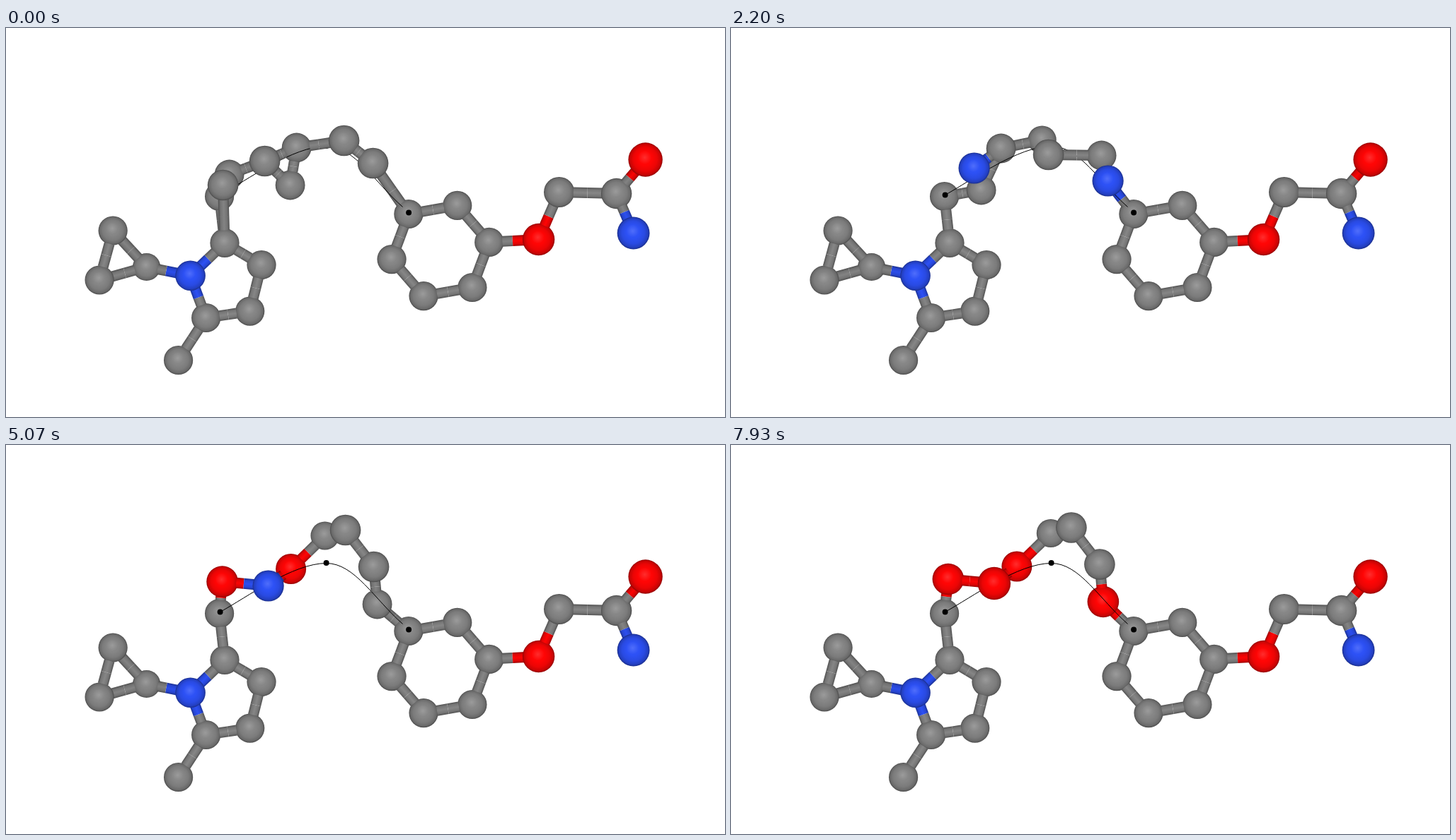
Write an HTML page with a canvas that moves like this. It is 1016x551 px and loops after 8000 ms.

```html
<!DOCTYPE html>
<html>
<head>
<meta charset="utf-8">
<style>
html, body { margin: 0; width: 100%; height: 100%; overflow: hidden; background: #fff; }
canvas { display: block; }
</style>
</head>
<body>
<canvas width="1016" height="551"></canvas>
<script>
const ctx = document.querySelector('canvas').getContext('2d');
const STEPS = 120, DURATION = 8000, BOND = 15;
const CURVE_DEPTH = 15.5;
const elements = {
  C: { rgb: [131, 131, 131], r: 20.6 },
  N: { rgb: [44, 79, 240], r: 20.9 },
  O: { rgb: [250, 5, 5], r: 22 }
};
const depths = { '+': 30, '0': 8, '-': -12 };
const curve = new Path2D('M302 236C340 215 405 167 452 167C492 167 520 218 560 253');

const atom = (el, x, y, z = 0) => ({ el, x, y, z });
const bondList = text => text.split(' ').map(s => s.split('-'));

// The scaffold comes towards the viewer on the right.
const scaffold = {};
const place = (key, el, x, y, z = Math.max(0, (x - 683) / 4)) =>
  scaffold[key] = atom(el, x, y, z);

// A regular polygon seen at an angle, spanned by the axes u and v.
function ring(keys, els, [cx, cy], [ux, uy], [vx, vy]) {
  [...keys].forEach((key, i) => {
    const a = i / keys.length * 2 * Math.PI, c = Math.cos(a), s = Math.sin(a);
    place(key, els[i], cx + ux * c + vx * s, cy + uy * c + vy * s);
  });
}
ring('bcdef', 'CCCCN', [311, 360], [-2.6, -56], [52.8, -8]);
ring('hij', 'CCC', [160, 327], [38, 11], [11, -40.4]);
ring('klmnop', 'CCCCCC', [613.3, 315], [-45, -52], [53.5, -44]);
place('a', 'C', 301, 238);
place('g', 'C', 243, 470);
place('q', 'O', 752, 299);
place('r', 'C', 781, 232);
place('s', 'C', 862, 234, 28);
place('t', 'O', 903, 186);
place('u', 'N', 886, 290);
scaffold.h.z = -25;
scaffold.f.z = 10;
const scaffoldBonds = bondList('a-b b-c c-d d-e e-f f-b e-g f-h h-i i-j j-h ' +
  'k-l l-m m-n n-o o-p p-k m-q q-r r-s s-t s-u');

// Key poses of the linker: step, elements, nearness, bonds, points.
const pose = (step, els, near, bonds, points) => ({
  step,
  bonds: bondList(bonds),
  atoms: points.split(' ').map((p, i) => atom(els[i], ...p.split(',').map(Number), depths[near[i]]))
});
const poses = [
  pose(0, 'CCCCCCC', '+0+00++', '0-b 0-1 1-2 2-4 2-3 3-4 4-5 5-6 6-k',
    '306,222 315,207 365,188 401,222 410,169 477,159 518,191'),
  pose(9, 'NCCOCCC', '-++-+-+', 'a-0 a-1 0-2 1-2 2-3 4-5 4-6 5-6 6-k',
    '320,187 336,202 383,197 401,180 451,170 468,153 526,199'),
  pose(33, 'NCCCCCN', '+00-+0+', 'a-1 1-2 0-2 2-3 3-4 4-5 5-6 6-k',
    '343,198 353,229 381,170 439,158 448,179 523,180 532,216'),
  pose(50, 'CCNCOON', '0+-0+++', 'a-0 0-1 1-2 1-3 3-4 4-5 5-6 6-k',
    '322,195 381,206 408,189 431,154 479,153 499,210 551,209'),
  pose(76, 'ONOCCCC', '0+--++0', 'a-0 0-1 1-2 2-3 3-4 4-5 5-6 6-k',
    '305,193 370,199 402,175 450,128 479,120 519,172 524,225')
];
// The last pose only drifts upwards and swaps two elements.
const settled = poses[poses.length - 1];
poses.push({
  step: STEPS - 1,
  bonds: settled.bonds,
  atoms: settled.atoms.map((a, i) => atom('OOOCCCO'[i], a.x + 1.3, a.y - 3.5, a.z))
});

const shade = (el, k) => `rgb(${elements[el].rgb.map(v => Math.min(255, v * k))})`;
const radius = a => elements[a.el].r + a.z * 0.04;
const noise = n => {
  const v = Math.sin(n * 127.1 + 3.7) * 43758.5453;
  return (v - Math.floor(v)) * 2 - 1;
};

function disc(x, y, r, fill) {
  ctx.fillStyle = fill;
  ctx.beginPath();
  ctx.arc(x, y, r, 0, 7);
  ctx.fill();
}

function drawAtom({ el, x, y, z }) {
  const r = radius({ el, z });
  const body = ctx.createRadialGradient(x - 1, y - 3, 0, x, y, r);
  [[0, 1.04], [0.4, 1.02], [0.7, 0.94], [0.9, 0.8], [1, 0.58]]
    .forEach(([at, k]) => body.addColorStop(at, shade(el, k)));
  disc(x, y, r, body);
  const glint = ctx.createRadialGradient(x - 1, y - 3, 0, x - 1, y - 3, r * 0.4);
  glint.addColorStop(0, 'rgba(255,255,255,.16)');
  glint.addColorStop(1, 'rgba(255,255,255,0)');
  disc(x, y, r, glint);
}

function drawBond(a, b) {
  const dx = b.x - a.x, dy = b.y - a.y, dz = b.z - a.z, d = Math.hypot(dx, dy) || 1;
  const cos = d / Math.hypot(d, dz), light = 0.65 + 0.35 * cos;
  // The bond leaves the rear ball at its surface and enters the front one beneath it.
  const start = dz >= 0 ? radius(a) * cos * 0.93 : 0;
  const end = dz <= 0 ? d - radius(b) * cos * 0.93 : d;
  const split = d * (0.5 - dz * 0.0015);
  const part = (el, from, to) => {
    if (to <= from) return;
    const g = ctx.createLinearGradient(0, -BOND / 2, 0, BOND / 2);
    [[0, 0.62], [0.2, 0.9], [0.5, 1.02], [0.8, 0.9], [1, 0.62]]
      .forEach(([at, k]) => g.addColorStop(at, shade(el, k * light)));
    ctx.fillStyle = g;
    ctx.fillRect(from, -BOND / 2, to - from, BOND);
  };
  ctx.save();
  ctx.translate(a.x, a.y);
  ctx.rotate(Math.atan2(dy, dx));
  part(a.el, start, Math.min(end, split));
  part(b.el, Math.max(start, split), end);
  ctx.restore();
}

function drawCurve() {
  ctx.strokeStyle = '#000';
  ctx.lineWidth = 1;
  ctx.stroke(curve);
  disc(302, 236, 4, '#000');
  disc(452, 166.5, 4, '#000');
  disc(568.5, 261, 4, '#000');
}

function linkerAt(step) {
  const next = Math.max(1, poses.findIndex(p => p.step >= step));
  const from = poses[next - 1], to = poses[next];
  const u = (step - from.step) / (to.step - from.step);
  const w = Math.min(1, u / 0.6), p = w * w * (3 - 2 * w);
  const jitter = (step < 65 ? 8 : 1) * Math.sin(Math.PI * u);
  const shape = p < 0.5 ? from : to;
  const mix = (i, key) => from.atoms[i][key] + (to.atoms[i][key] - from.atoms[i][key]) * p;
  return {
    bonds: shape.bonds,
    atoms: shape.atoms.map((a, i) => atom(a.el,
      mix(i, 'x') + jitter * noise(step * 17 + i),
      mix(i, 'y') + jitter * noise(step * 17 + i + 8),
      mix(i, 'z')))
  };
}

function render(time) {
  const step = Math.floor((time % DURATION) / DURATION * STEPS + 0.06) % STEPS;
  const linker = linkerAt(step);
  const all = { ...scaffold, ...linker.atoms };
  const items = Object.values(all).map(a => ({ z: a.z, draw: () => drawAtom(a) }));
  for (const [i, j] of [...scaffoldBonds, ...linker.bonds]) {
    const a = all[i], b = all[j];
    items.push({ z: (a.z + b.z) / 2, draw: () => drawBond(a, b) });
  }
  items.push({ z: CURVE_DEPTH, draw: drawCurve });
  items.sort((a, b) => a.z - b.z);
  ctx.setTransform(1, 0, 0, 1, 0.6, 0.5);
  ctx.clearRect(-1, -1, 1018, 553);
  items.forEach(item => item.draw());
}

const origin = performance.now();
function tick() {
  render(performance.now() - origin);
  requestAnimationFrame(tick);
}
tick();
</script>
</body>
</html>
```
